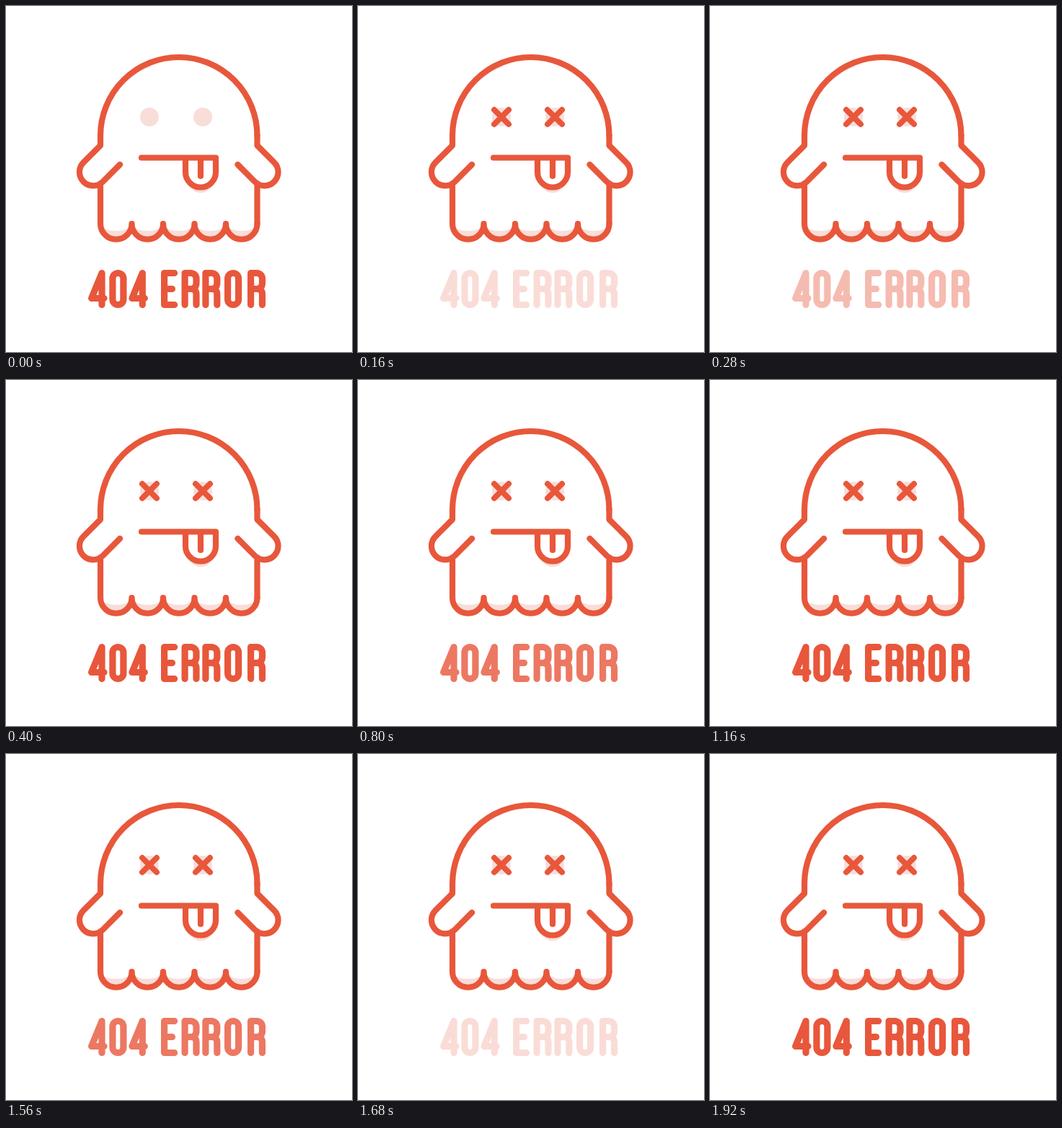
Animation, 480 px wide and 480 px high, one loop 2 s. Source, as an HTML page:

```html
<!DOCTYPE html>
<html lang="en">
<head>
<meta charset="utf-8">
<title>404 error</title>
<style>
  html, body { margin: 0; width: 100%; height: 100%; overflow: hidden; background: #fff; }
  svg { display: block; width: 100vw; height: 100vh; }
  .line { fill: none; stroke: #e8573b; stroke-width: 8.2; stroke-linecap: round; stroke-linejoin: round; }
  .pale { fill: #f8ddd9; }
  .white { fill: #fff; }
  .cross { stroke-width: 8; }
  .type { stroke-width: 9.2; }
</style>
</head>
<body>
<svg viewBox="0 0 480 480">
  <defs>
    <path id="arm" d="M131 180V193.500L107.500 217A18.800 18.800 0 0 0 134.200 243.800L158 220M131 246V302"/>
    <path id="cross" d="M-10-10L10 10M10-10L-10 10"/>
    <path id="four" d="M19 44V0L4.600 35H22"/>
    <path id="zero" d="M4.600 7.500A7.500 7.500 0 0 1 19.600 7.500V36.500A7.500 7.500 0 0 1 4.600 36.500Z"/>
    <path id="e" d="M18.600 0H4.600V44H18.600M4.600 22H15.500"/>
    <path id="r" d="M4.600 44V0H13A7.500 7.500 0 0 1 20.500 7.500V14.500A7.500 7.500 0 0 1 13 22H4.600M13 22Q20.500 22 20.500 29.500V44"/>
  </defs>

  <path id="shade" class="pale"/>
  <path class="pale" d="M249 230V234.500A21 24.500 0 0 0 291 234.500V230Z"/>
  <path class="white" d="M249 210.500V230.500A21 21 0 0 0 291 230.500V210.500Z"/>

  <g class="line">
    <path d="M131 180A108.750 109 0 0 1 348.500 180"/>
    <use href="#arm"/>
    <use href="#arm" transform="translate(479.500) scale(-1 1)"/>
    <path id="hem"/>
    <path d="M188 210.500H291V230.500A21 21 0 0 1 249 230.500V212M270 212V236"/>
  </g>

  <circle class="pale" cx="199" cy="154" r="13"/>
  <circle class="pale" cx="273" cy="154" r="13"/>
  <g id="dead" class="line cross">
    <use href="#cross" x="199" y="154"/>
    <use href="#cross" x="273" y="154"/>
  </g>

  <g id="label" class="line type" role="img" aria-label="404 ERROR"></g>
</svg>
<script>
const $ = id => document.getElementById(id);
const STEP = 40, LOOP = 2000, BLINK = 19, FADE = 5;

// Scalloped hem with a shaded crescent in each fold
const folds = 5, left = 131, hemY = 302, w = 217.5 / folds, r = w / 2;
let hem = `M${left} ${hemY}`, shade = '';
for (let i = 0; i < folds; i++) {
  const a = left + i * w, b = a + w;
  hem += `A${r} ${r} 0 0 0 ${b} ${hemY}`;
  shade += `M${a} ${hemY}A${r} ${r} 0 0 0 ${b} ${hemY}A${r} 10 0 0 1 ${a} ${hemY}Z`;
}
$('hem').setAttribute('d', hem);
$('shade').setAttribute('d', shade);

const letters = [['four', 114], ['zero', 143.3], ['four', 170.3], ['e', 215],
  ['r', 243.5], ['r', 272.3], ['zero', 303], ['r', 335]];
$('label').innerHTML = letters
  .map(([id, x]) => `<use href="#${id}" x="${x}" y="370.500"/>`).join('');

function draw(ms) {
  const step = Math.floor((ms % LOOP) / STEP);
  const n = step % BLINK;
  $('label').setAttribute('opacity', n < 2 * FADE ? Math.abs(1 - n / FADE) : 1);
  $('dead').setAttribute('visibility', step ? 'visible' : 'hidden');
}

const start = performance.now();
function tick() {
  draw(performance.now() - start);
  requestAnimationFrame(tick);
}
tick();
</script>
</body>
</html>
```
